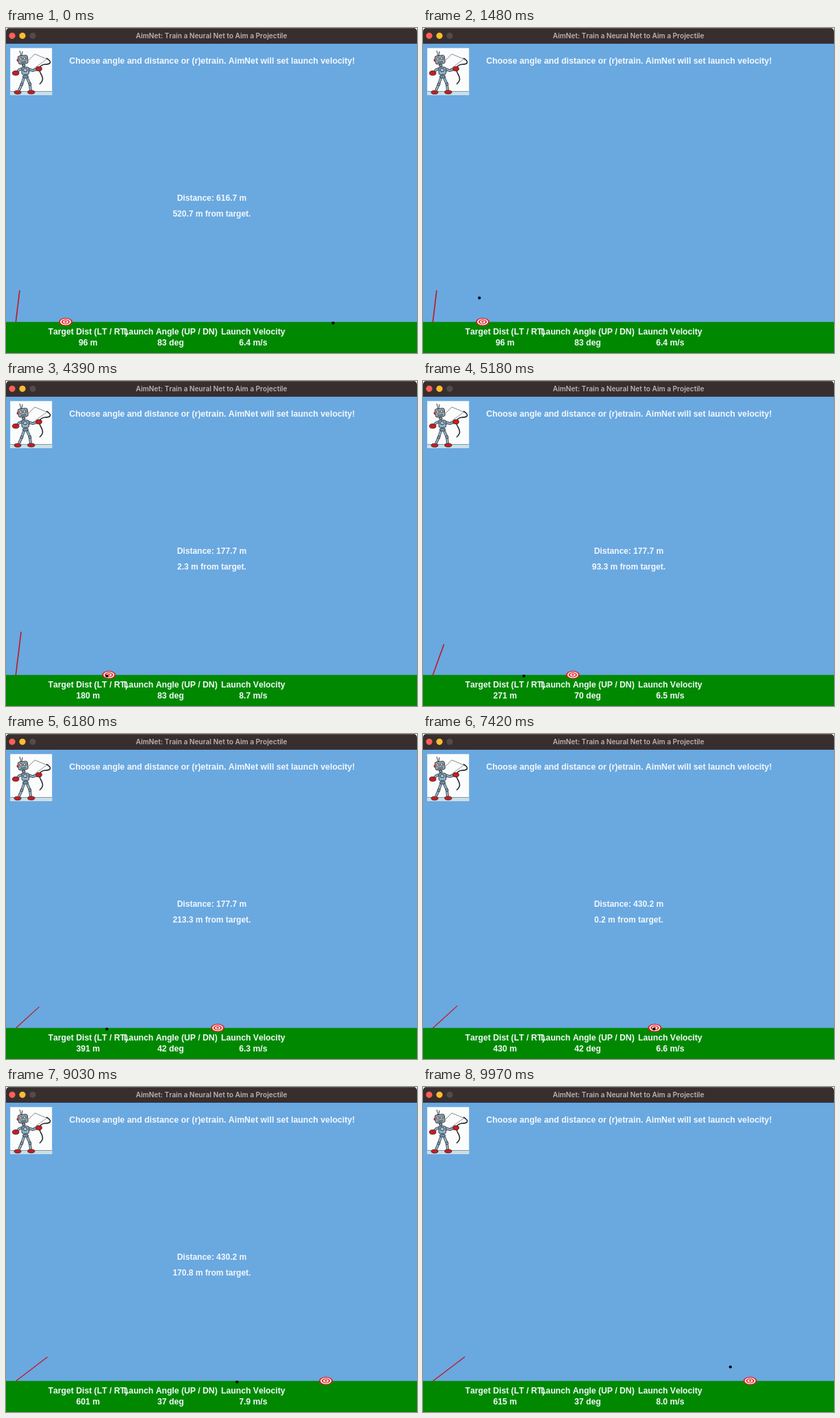
An HTML page with a canvas for the animation above (10000 ms loop, 600x474 px).

```html
<!DOCTYPE html>
<html lang="en">
<head>
<meta charset="utf-8">
<title>AimNet</title>
<style>
  html, body { margin: 0; width: 100%; height: 100%; overflow: hidden; background: #6aa8e0; }
  canvas { display: block; }
</style>
</head>
<body>
<canvas id="stage" width="600" height="474"></canvas>
<script>
const ctx = document.getElementById('stage').getContext('2d');
const LOOP = 10000, FRAMES_PER_MS = 0.033, GROUND = 428.7, SCALE = 0.7525;
const TEXT = '#f3f8fc', RED = '#cf1a1c', INK = '#22242a', STEEL = '#8fb3cb';

// [ms, value] keys, linear in between
const targetKeys = [[1880, 96], [2580, 180], [4422, 180], [6505, 430], [7598, 430], [9140, 615]];
const angleKeys = [[4747, 83], [6113, 42], [8700, 42], [8867, 37]];
const shots = [
  { start: -3000, reach: 616.7 },
  { start: 500, reach: 97.6 },
  { start: 2750, reach: 177.7 },
  { start: 6600, reach: 430.2 },
  { start: 9215, reach: 616.7 }
];

function valueAt(keys, t) {
  if (t <= keys[0][0]) return keys[0][1];
  for (let i = 1; i < keys.length; i++) {
    const [t0, a] = keys[i - 1], [t1, b] = keys[i];
    if (t < t1) return a + (b - a) * (t - t0) / (t1 - t0);
  }
  return keys[keys.length - 1][1];
}

function aimAt(t) {
  const target = Math.floor(valueAt(targetKeys, t) + 1e-6);
  const degrees = Math.round(valueAt(angleKeys, t));
  const angle = degrees * Math.PI / 180;
  const gain = 9.82 + target * 0.0002;
  return { target, degrees, angle, speed: Math.sqrt(target / (gain * Math.sin(2 * angle))) };
}

function ballAt(t) {
  const shot = shots.filter(s => s.start <= t).pop();
  const { angle, speed } = aimAt(shot.start);
  const duration = 20 * speed * Math.sin(angle) / 0.12;
  const p = Math.min(1, (t - shot.start) / duration);
  const height = shot.reach * Math.tan(angle) * p * (1 - p);
  return {
    reach: shot.reach,
    landed: p === 1,
    x: 13.5 + SCALE * shot.reach * p,
    y: p === 1 ? 430.3 : GROUND - SCALE * height
  };
}

function rect(color, x, y, w, h) {
  ctx.fillStyle = color;
  ctx.fillRect(x, y, w, h);
}

function oval(color, x, y, rx, ry = rx, outline) {
  ctx.beginPath();
  ctx.ellipse(x, y, rx, ry, 0, 0, 2 * Math.PI);
  ctx.fillStyle = color;
  ctx.fill();
  if (outline) {
    ctx.strokeStyle = outline;
    ctx.lineWidth = 0.8;
    ctx.stroke();
  }
}

function line(color, width, ...points) {
  ctx.beginPath();
  points.forEach(([x, y]) => ctx.lineTo(x, y));
  ctx.strokeStyle = color;
  ctx.lineWidth = width;
  ctx.stroke();
}

function label(text, x, baseline, size) {
  ctx.font = `bold ${size}px "Liberation Sans", Arial, sans-serif`;
  ctx.fillStyle = TEXT;
  ctx.fillText(text, x, baseline);
}

function limb(width, ...points) {
  line(INK, width + 1.4, ...points);
  line(STEEL, width, ...points);
}

function plate(color, x, y, w, h) {
  ctx.beginPath();
  ctx.roundRect(x, y, w, h, 2.5);
  ctx.fillStyle = color;
  ctx.fill();
  ctx.strokeStyle = INK;
  ctx.lineWidth = 0.9;
  ctx.stroke();
}

function drawRobot() {
  rect('#fbfcfc', 6.2, 29.3, 61, 68.4);
  rect('#c9dfea', 6.2, 93, 61, 4.7);
  line('#5b6a72', 0.7, [6.2, 92.5], [67, 92.5]);

  // bow and string
  line('#55585c', 0.7, [33, 47], [42, 38], [59, 45]);
  line('#55585c', 0.6, [34, 64], [60, 45]);
  ctx.beginPath();
  ctx.moveTo(59, 44);
  ctx.bezierCurveTo(69, 50, 64, 53, 57, 53);
  ctx.bezierCurveTo(47, 54, 48, 62, 51, 67);
  ctx.bezierCurveTo(55, 74, 54, 78, 49, 82);
  ctx.strokeStyle = INK;
  ctx.lineWidth = 1.5;
  ctx.stroke();

  limb(2.4, [26, 73], [23, 82], [19, 91]);
  limb(2.4, [31, 73], [35, 82], [36, 91]);
  oval(STEEL, 23, 82, 1.9, 1.9, INK);
  oval(STEEL, 35, 82, 1.9, 1.9, INK);
  oval(RED, 17, 93.8, 5, 2.6, INK);
  oval(RED, 36.8, 93.6, 5.2, 2.6, INK);

  limb(2.2, [24, 59], [19, 61], [16, 65]);
  limb(2.2, [33, 60], [39, 62], [46, 60]);
  plate(STEEL, 23, 57, 10.5, 11);
  plate('#a9c5d6', 25, 59, 6, 4.5);
  plate('#6f96b2', 24.5, 69, 8, 4);
  oval(RED, 14.2, 65.8, 4.8, 3.3, INK);
  oval(RED, 48, 59.5, 4.4, 3.2, INK);

  line(INK, 0.9, [22, 40], [20, 33]);
  line(INK, 0.9, [23, 40], [24, 34]);
  plate('#6f96b2', 23.5, 52.5, 4.5, 4);
  ctx.save();
  ctx.translate(24.8, 46.2);
  ctx.rotate(-0.12);
  plate('#94abb9', -7, -6, 14, 12);
  oval('#ffffff', -2.6, -1.3, 2.1, 2.1, INK);
  oval('#ffffff', 3, -1.3, 2.1, 2.1, INK);
  oval(INK, -2.2, -1.2, 0.8);
  oval(INK, 3.4, -1.2, 0.8);
  line(INK, 0.9, [-4, 3.5], [4, 3.5]);
  oval(RED, -8, 0, 1.3, 1.9);
  ctx.restore();
}

function drawTitleBar() {
  rect('#ffffff', 0, 0, 600, 12);
  ctx.beginPath();
  ctx.roundRect(0, 0, 600, 22.5, [5, 5, 0, 0]);
  ctx.fillStyle = '#382e2e';
  ctx.fill();
  rect('#6b6262', 5, 0, 590, 0.7);
  rect('#1d1a1d', 0, 22, 600, 0.6);
  ['#fe5f57', '#febc2e', '#544a49'].forEach((color, i) => oval(color, 9 + 15 * i, 11.3, 4.6));
  ctx.font = '600 10.1px Inter, sans-serif';
  ctx.fillStyle = '#bbb3b2';
  ctx.fillText('AimNet: Train a Neural Net to Aim a Projectile', 300, 14.5);
}

function drawWindow() {
  rect('#6aa8e0', 0, 22, 600, 452);
  rect('#008900', 0, GROUND, 600, 474 - GROUND);
  drawTitleBar();
  label('Choose angle and distance or (r)etrain. AimNet will set launch velocity!', 300.8, 52, 12.35);
  drawRobot();
}

function draw(t) {
  const aim = aimAt(t), ball = ballAt(t);
  drawWindow();

  const length = 7.3 * aim.speed, cos = Math.cos(aim.angle), sin = Math.sin(aim.angle);
  line('#c4141a', 1.6 * Math.max(cos, sin), [14.3, GROUND + 0.3],
    [14.3 + length * cos, GROUND - length * sin]);

  const targetX = 14.8 + SCALE * aim.target;
  [10, 8, 6, 4, 2].forEach((r, i) =>
    oval(i % 2 ? '#fbf3f1' : '#dc1c20', targetX, 428.6, r, r * 0.58));
  oval('#000', ball.x, ball.y, 2.1);

  [
    ['Target Dist (LT / RT)', aim.target + ' m'],
    ['Launch Angle (UP / DN)', aim.degrees + ' deg'],
    ['Launch Velocity', aim.speed.toFixed(1) + ' m/s']
  ].forEach(([name, value], i) => {
    label(name, 119.8 + 120.5 * i, 447.3, 12.2);
    label(value, 119.8 + 120.5 * i, 462.8, 12.2);
  });

  if (ball.landed) {
    const miss = Math.abs(aim.target - ball.reach);
    label(`Distance: ${ball.reach.toFixed(1)} m`, 300.4, 251.8, 12);
    label(`${miss.toFixed(1)} m from target.`, 300.4, 274.5, 12);
  }
}

ctx.textAlign = 'center';
ctx.fontKerning = 'none';
const begin = performance.now();

function tick() {
  const elapsed = (performance.now() - begin) % LOOP;
  draw(Math.floor(elapsed * FRAMES_PER_MS + 0.17) / FRAMES_PER_MS);
  requestAnimationFrame(tick);
}
tick();
</script>
</body>
</html>
```
